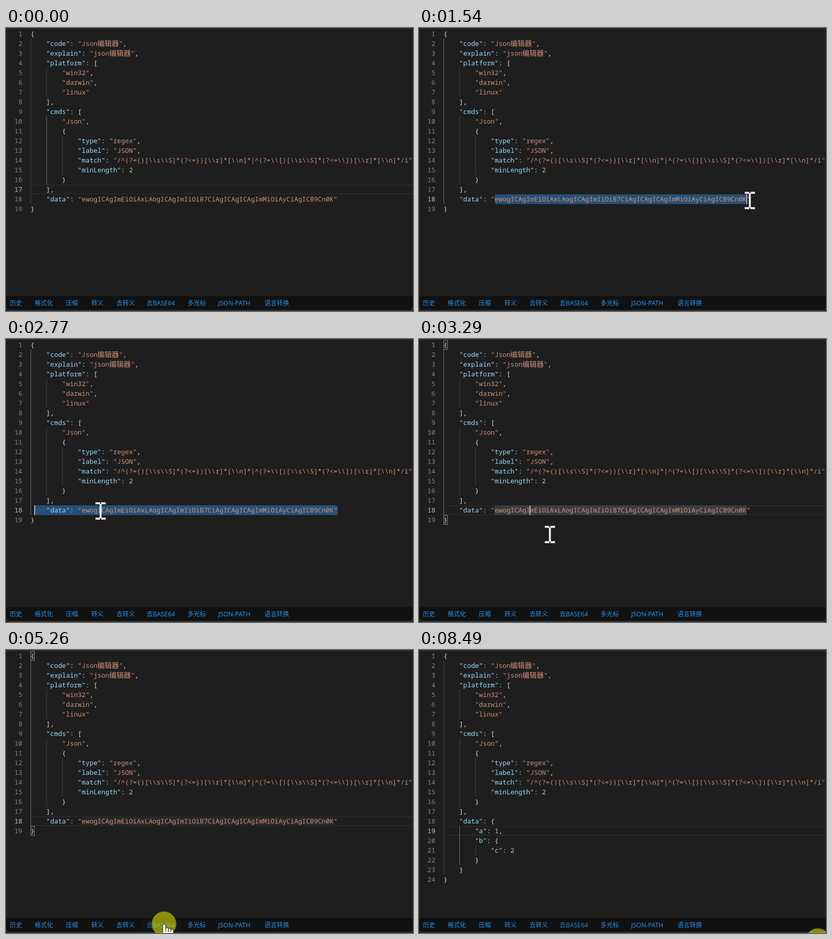
These frames come from a looping animation (796 px wide and 553 px high, 8.65 s). An HTML page with a canvas:

```html
<!DOCTYPE html>
<html lang="zh">
<head>
<meta charset="utf-8">
<title>JSON editor</title>
<style>
  html, body { margin: 0; width: 100%; height: 100%; overflow: hidden; background: #1e1e1e; }
  canvas { display: block; }
</style>
</head>
<body>
<canvas id="stage" width="796" height="553"></canvas>
<script>
const ctx = document.getElementById('stage').getContext('2d', { alpha: false });
const LOOP = 8650, W = 796, H = 553;
const LEFT = 48, COL = 7.7, ROW = 19;
const MONO = '500 12.83px "Noto Sans Mono", "DejaVu Sans Mono", monospace';
const CJK = '"Noto Sans CJK SC", "Noto Sans CJK", sans-serif';
const CODE_FONTS = [MONO, '14px ' + CJK];
const UI_FONTS = ['500 12.3px "Noto Sans", sans-serif', '12px ' + CJK];

const head = String.raw`{
    "code": "Json编辑器",
    "explain": "json编辑器",
    "platform": [
        "win32",
        "darwin",
        "linux"
    ],
    "cmds": [
        "Json",
        {
            "type": "regex",
            "label": "JSON",
            "match": "/^(?={)[\\s\\S]*(?<=})[\\r]*[\\n]*|^(?=\\[)[\\s\\S]*(?<=\\])[\\r]*[\\n]*/i",
            "minLength": 2
        }
    ],
    "data": `;
const before = (head + `"ewogICAgImEiOiAxLAogICAgImIiOiB7CiAgICAgICAgImMiOiAyCiAgICB9Cn0K"
}`).split('\n');
const after = (head + `{
        "a": 1,
        "b": {
            "c": 2
        }
    }
}`).split('\n');

const buttons = [['历史', 7.5], ['格式化', 56], ['压缩', 117], ['转义', 167], ['去转义', 216],
  ['去BASE64', 275], ['多光标', 355], ['JSON-PATH', 415], ['语言转换', 505.5]];

// Pointer path: time, x, y
const path = [
  [630, 669, 469], [940, 597, 332], [1390, 597, 332], [1540, 647, 337],
  [1700, 668, 335], [1850, 668, 335], [1996, 688, 335], [2080, 688, 335],
  [2150, 672, 336], [2540, 59, 340], [2620, 59, 340], [2756, 185, 336],
  [2920, 219, 335], [3160, 219, 335], [3288, 256, 382], [3840, 312, 545],
  [4300, 309, 538], [4550, 309, 538], [4700, 309, 535], [6560, 309, 535],
  [6950, 354, 556]
];
const presses = [[1160, 1310], [1770, 1850], [2150, 2600], [3000, 3150], [5260, 5350]];

const colX = c => LEFT + c * COL;
const rowY = n => 2 + (n - 1) * ROW;
const within = (t, a, b) => t >= a && t < b;

function rect(x, y, w, h, color) {
  ctx.fillStyle = color;
  ctx.fillRect(x, y, w, h);
}

function rounded(x, y, w, h, r, color) {
  ctx.fillStyle = color;
  ctx.beginPath();
  ctx.roundRect(x, y, w, h, r);
  ctx.fill();
}

// Draws Latin and Chinese runs in their own fonts, returns the end x
function mixedText(text, x, y, [latin, chinese]) {
  for (const run of text.match(/[\u4e00-\u9fff]+|[^\u4e00-\u9fff]+/g) || []) {
    ctx.font = run >= '\u4e00' ? chinese : latin;
    ctx.fillText(run, x, y);
    x += ctx.measureText(run).width;
  }
  return x;
}

function pointerAt(t) {
  const tick = Math.floor(t / 76) * 76 + 20;
  const i = path.findIndex(p => p[0] > tick);
  if (i === 0) return path[0].slice(1);
  if (i < 0) return path[path.length - 1].slice(1);
  const [t0, x0, y0] = path[i - 1], [t1, x1, y1] = path[i];
  const k = (tick - t0) / (t1 - t0);
  return [x0 + (x1 - x0) * k, y0 + (y1 - y0) * k];
}

function drawCode(line, y) {
  let x = LEFT;
  for (const [all, str, colon] of line.matchAll(/("[^"]*")(:?)|\d+|\s+|[^"\d\s]+/g)) {
    const color = str ? (colon ? '#9cdcfe' : '#ce9178') : /\d/.test(all) ? '#b5cea8' : '#dcdcdc';
    ctx.fillStyle = color;
    x = mixedText(str || all, x, y, CODE_FONTS);
    if (colon) {
      ctx.fillStyle = '#dcdcdc';
      x = mixedText(colon, x, y, CODE_FONTS);
    }
  }
}

function drawGuides(lines, active) {
  lines.forEach((line, i) => {
    const depth = line.search(/\S/) / 4;
    for (let d = 0; d < depth; d++) {
      const lit = d === active[0] && within(i + 1, active[1], active[2] + 1);
      rect(Math.round(colX(d * 4)), rowY(i + 1), 1, ROW, lit ? '#707070' : '#404040');
    }
  });
}

function editorState(t, px) {
  if (t < 1160) return { line: 17, guide: [1, 10, 16] };
  if (t >= 5350) return { line: 19, guide: [1, 19, 22] };
  const s = { line: 18, guide: [0, 2, 18] };
  if (t < 1240) return { ...s, caret: 71, word: '#373c40' };
  if (t < 1850) return { ...s, caret: 77, sel: [13, 77] };
  if (t < 2150) return { ...s, caret: 78 };
  if (t < 3000) {
    const c = t < 2620 ? Math.max(1, Math.min(78, Math.round((px - LEFT) / COL))) : 1;
    return { ...s, caret: c, sel: [c, 78] };
  }
  // Pressing the button takes the focus away from the editor
  if (t >= 5260) return { ...s, word: '#272728' };
  const lit = Math.floor(Math.max(0, t - 3050) / 500) % 2 === 0;
  return { ...s, caret: lit ? 22 : null, word: '#373c40' };
}

function drawEditor(t, px) {
  const lines = t < 5350 ? before : after;
  const s = editorState(t, px);
  const top = rowY(s.line);

  if (!s.sel) {
    rect(LEFT, top, W, 2, '#282828');
    rect(LEFT, top + ROW - 2, W, 2, '#282828');
  }
  if (s.word) rect(colX(13), top, 64 * COL, ROW, s.word);
  if (s.sel) {
    const [a, b] = s.sel;
    rounded(colX(a), top, (b - a) * COL, ROW, 3, '#264f78');
    for (let c = a; c < 4; c++) rect(colX(c) + 3, top + 9, 2, 2, '#4a6a8a');
  }
  drawGuides(lines, s.guide);
  if (s.line === 18 && !s.sel) {
    for (const n of [1, 19]) {
      rect(LEFT, rowY(n), 8, ROW, '#1b251b');
      ctx.strokeStyle = '#888';
      ctx.lineWidth = 1;
      ctx.strokeRect(LEFT + .5, rowY(n) + .5, 7, ROW - 1);
    }
  }
  lines.forEach((line, i) => {
    const y = rowY(i + 1) + 14;
    ctx.font = MONO;
    ctx.textAlign = 'right';
    ctx.fillStyle = i + 1 === s.line ? '#c6c6c6' : '#858585';
    ctx.fillText(i + 1, 32, y);
    ctx.textAlign = 'left';
    drawCode(line, y);
  });
  if (s.caret) rect(Math.round(colX(s.caret)) - 1, top, 2, ROW, '#aeafad');
}

function drawFooter(t) {
  rect(0, 524, W, 29, '#111');
  const hover = within(t, 3840, 6560);
  if (hover) rounded(265, 526, 76, 24, 3, '#11161b');
  buttons.forEach(([label, x], i) => {
    ctx.fillStyle = i === 5 && t >= 3840 ? (hover ? '#2174b8' : '#2480cf') : '#2492f0';
    mixedText(label, x, 542, UI_FONTS);
  });
}

function drawFrame() {
  rect(0, 0, W, 1.5, '#2e2e2e');
  ctx.beginPath();
  ctx.rect(0, 540, W, 13);
  ctx.roundRect(0, 500, W, 52, 8);
  ctx.save();
  ctx.clip('evenodd');
  rect(0, 543, W, 10, '#1b1b1b');
  ctx.restore();
  ctx.strokeStyle = '#464646';
  ctx.lineWidth = 1;
  ctx.beginPath();
  ctx.moveTo(0, 546);
  ctx.quadraticCurveTo(1, 551.5, 8, 551.5);
  ctx.lineTo(W - 8, 551.5);
  ctx.quadraticCurveTo(W - 1, 551.5, W, 546);
  ctx.stroke();
}

function drawSpot(x, y) {
  ctx.fillStyle = 'rgba(255,255,0,.5)';
  ctx.beginPath();
  ctx.arc(x, y, 24, 0, Math.PI * 2);
  ctx.fill();
}

function drawBeam(x, y) {
  for (const dy of [-17, 13]) {
    rect(x - 10, y + dy, 9, 4, '#e6e6e6');
    rect(x + 1, y + dy, 9, 4, '#e6e6e6');
  }
  rect(x - 2, y - 14, 4, 28, '#e6e6e6');
}

function drawHand(x, y) {
  const fingers = [[-2, 1, 5, 24], [4, 8, 4, 16], [9, 9, 4, 15], [14, 11, 4, 13]];
  for (const [dx, dy, w, h] of fingers) rounded(x + dx - 1, y + dy - 1, w + 2, h + 2, 3, '#2a2a10');
  for (const [dx, dy, w, h] of fingers) rounded(x + dx, y + dy, w, h, 2, '#f6f6e2');
  rect(x - 2, y + 16, 20, 9, '#f6f6e2');
}

function draw() {
  const t = performance.now() % LOOP;
  const [x, y] = pointerAt(t).map(Math.round);
  rect(0, 0, W, H, '#1e1e1e');
  drawEditor(t, x);
  drawFooter(t);
  drawFrame();
  if (presses.some(([a, b]) => within(t, a, b))) drawSpot(x, y);
  if (within(t, 630, 6950)) (y < 524 ? drawBeam : drawHand)(x, y);
  if (t >= 8490) drawSpot(780, 568);
  requestAnimationFrame(draw);
}
draw();
</script>
</body>
</html>
```
